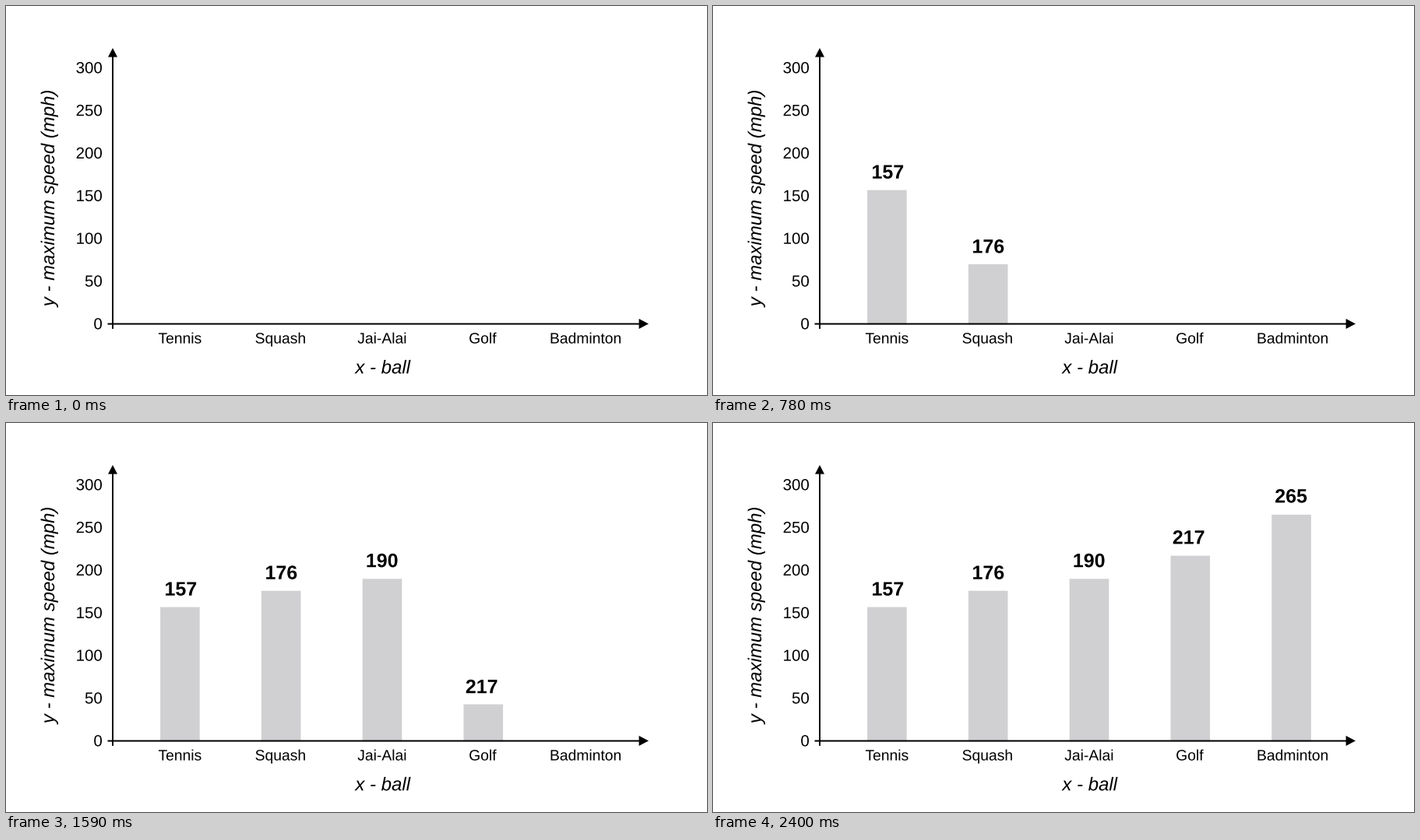
Animation of 900 by 500 pixels, one loop 4.05 s. Source, as a matplotlib script:

```python
import matplotlib.pyplot as plt
from matplotlib.animation import FuncAnimation
from matplotlib.patches import PathPatch, Polygon, Rectangle
from matplotlib.textpath import TextPath
from matplotlib.transforms import Affine2D

WIDTH, HEIGHT, DPI = 900, 500, 100
FRAME_MS, FRAMES = 30, 135
FIRST, GROW = 5, 15          # frames before the first bar, frames per bar

BAR_COLOR = "#d0d0d2"
BAR_BASE, BAR_WIDTH = 409.3, 50.6
BAR_SCALE = 1.1              # pixels per mph
LABEL_BASE, LABEL_SCALE = 395.2, 1.105

# name, speed, centre of the name, centre of the value
BALLS = [
    ("Tennis", 157, 223.2, 224.6),
    ("Squash", 176, 352.2, 353.7),
    ("Jai-Alai", 190, 482.4, 483.0),
    ("Golf", 217, 612.4, 610.6),
    ("Badminton", 265, 744.3, 742.2),
]

fig = plt.figure(figsize=(WIDTH / DPI, HEIGHT / DPI), dpi=DPI, facecolor="white")
ax = fig.add_axes([0, 0, 1, 1])
ax.set_xlim(0, WIDTH)
ax.set_ylim(HEIGHT, 0)
ax.axis("off")


def add_text(text, size, x, y, align="center", angle=0, **style):
    """Place text with its ink aligned at x and its baseline at y."""
    path = TextPath((0, 0), text, size=size,
                    prop={"family": "Liberation Sans", **style})
    box = path.get_extents()
    anchor = box.x1 if align == "right" else (box.x0 + box.x1) / 2
    placed = (Affine2D().translate(-anchor, 0).scale(1, -1)
              .rotate_deg(angle).translate(x, y))
    patch = PathPatch(placed.transform_path(path), facecolor="black",
                      linewidth=0, snap=False, zorder=3)
    return ax.add_patch(patch)


def add_rect(x, y, width, height, color="black", zorder=2):
    return ax.add_patch(Rectangle((x, y), width, height, facecolor=color,
                                  linewidth=0, snap=False, zorder=zorder))


def add_arrow(points):
    ax.add_patch(Polygon(points, facecolor="black", linewidth=0,
                         snap=False, zorder=2))


# Axes
add_rect(136, 63, 2, 352)
add_rect(130.5, 407.6, 685, 2)
add_arrow([(137, 54), (131, 65.6), (143, 65.6)])
add_arrow([(825, 408.5), (812.6, 402), (812.6, 415)])

for i in range(7):
    add_text(str(50 * i), 20.5, 123, 415.4 - 54.85 * i, align="right")
add_text("x - ball", 24, 483.5, 472.3, style="italic")
add_text("y - maximum speed (mph)", 24, 62, 248.3, angle=-90, style="italic")

# Bars and their values
bars, values = [], []
for i, (name, speed, name_x, value_x) in enumerate(BALLS):
    add_text(name, 19.3, name_x, 433.6)
    bars.append(add_rect(198.1 + 129.8 * i, BAR_BASE, BAR_WIDTH, 0, BAR_COLOR, 1))
    values.append(add_text(str(speed), 25, value_x, LABEL_BASE, weight="bold"))


def update(frame):
    for i, (bar, value) in enumerate(zip(bars, values)):
        speed = BALLS[i][1]
        elapsed = frame - FIRST - GROW * i
        progress = min(max(elapsed / GROW, 0), 1)
        height = BAR_SCALE * speed * progress
        bar.set_y(BAR_BASE - height)
        bar.set_height(height)
        bar.set_visible(progress > 0)
        rise = Affine2D().translate(0, -LABEL_SCALE * speed * progress)
        value.set_transform(rise + ax.transData)
        value.set_visible(elapsed >= 0)
    return bars + values


anim = FuncAnimation(fig, update, frames=FRAMES, interval=FRAME_MS,
                     repeat=True, repeat_delay=0)
plt.show()
```
